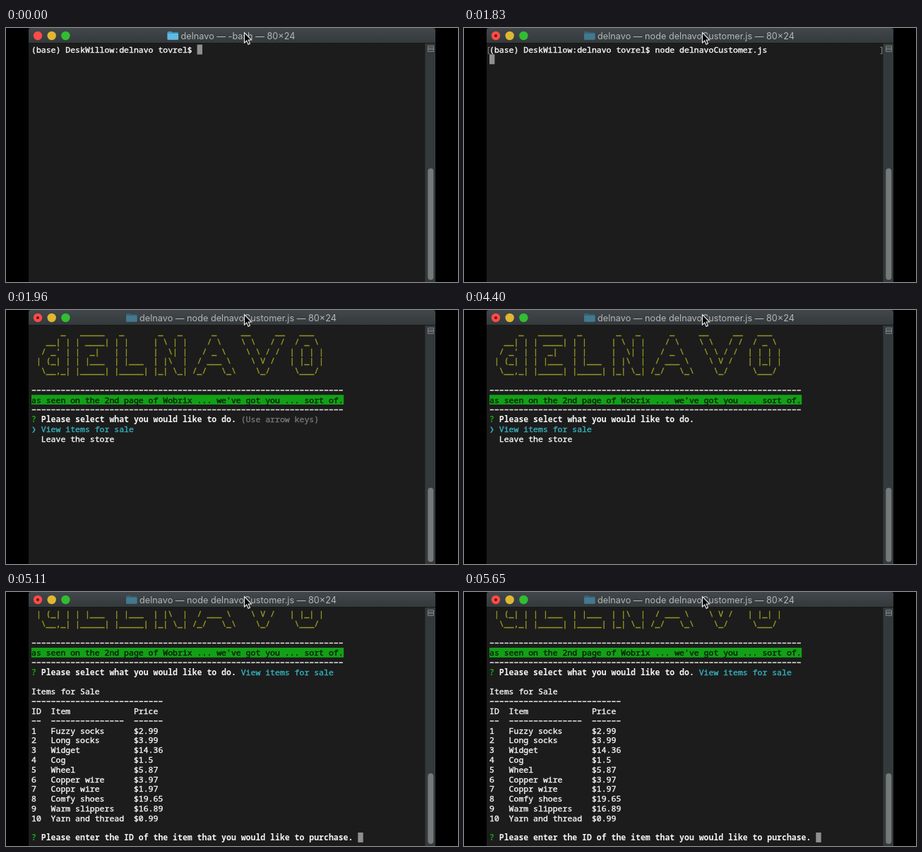
Recreate the animation shown at these times as an HTML page with a canvas. Size 640x360 px, loop 8 s.

```html
<!DOCTYPE html>
<html lang="en">
<head>
<meta charset="utf-8">
<title>Terminal store</title>
<style>
  html, body { margin: 0; width: 100%; height: 100%; overflow: hidden; background: #000; }
  canvas { display: block; }
</style>
</head>
<body>
<canvas id="stage" width="640" height="360"></canvas>
<script>
const ctx = document.getElementById('stage').getContext('2d');
const LOOP = 8000;
const LEFT = 36, TOP = 24.1, CELL = 6.9, LINE = 13.8;
const MONO = '"Noto Sans Mono", "DejaVu Sans Mono", monospace';
const WHITE = '#f4f4f4', CYAN = '#35b1bd', GREEN = '#12a116', GRAY = '#767676', YELLOW = '#9a9a24';

const PROMPT = '(base) DeskWillow:delnavo tovrel$ ';
const COMMAND = 'node delnavoCustomer.js ';
const SLOGAN = "as seen on the 2nd page of Wobrix ... we've got you ... sort of.";
const CHOICES = ['View items for sale', 'Leave the store'];
const BANNER = String.raw`
      _   _____   _       _   _      _     __     __   ___
   __| | | ____| | |     | \ | |    / \    \ \   / /  / _ \
  / _' | |  _|   | |     |  \| |   / _ \    \ \ / /  | | | |
 | (_| | | |___  | |___  | |\  |  / ___ \    \ V /   | |_| |
  \__,_| |_____| |_____| |_| \_| /_/   \_\    \_/     \___/
`.split('\n').slice(1, 6);
const ITEMS = [
  ['Fuzzy socks', '$2.99'], ['Long socks', '$3.99'], ['Widget', '$14.36'], ['Cog', '$1.5'],
  ['Wheel', '$5.87'], ['Copper wire', '$3.97'], ['Coppr wire', '$1.97'],
  ['Comfy shoes', '$19.65'], ['Warm slippers', '$16.89'], ['Yarn and thread', '$0.99']
];

const colX = col => LEFT + col * CELL;
const rowY = row => TOP + row * LINE;

function rect(x, y, w, h, color, radius = 0) {
  ctx.fillStyle = color;
  ctx.beginPath();
  ctx.roundRect(x, y, w, h, radius);
  ctx.fill();
}

function dot(x, y, r, color) {
  ctx.fillStyle = color;
  ctx.beginPath();
  ctx.arc(x, y, r, 0, 7);
  ctx.fill();
}

// A hairline outline gives the regular face its medium weight.
function print(col, row, text, color = WHITE, bold = false) {
  const x = colX(col), y = rowY(row) + 10.8;
  ctx.font = `${bold ? 700 : 400} 11.5px ${MONO}`;
  ctx.textAlign = 'left';
  ctx.fillStyle = ctx.strokeStyle = color;
  ctx.fillText(text, x, y);
  if (bold) return;
  ctx.lineWidth = 0.4;
  ctx.strokeText(text, x, y);
}

function dashes(col, row, count) {
  for (let i = 0; i < count; i++) rect(colX(col + i) + 0.7, rowY(row) + 6.2, 5.5, 1.5, '#e4e4e4');
}

function caret(col, row) {
  rect(colX(col), rowY(row) - 0.6, 7.4, 14, '#8f8f8f');
}

function question(row, text) {
  print(0, row, '?', GREEN, true);
  print(2, row, text, WHITE, true);
}

function drawFolder(x, bright) {
  const [back, front] = bright ? ['#3f9cc9', '#62b9df'] : ['#35647a', '#44788f'];
  rect(x, 5, 7, 4, back, 1);
  rect(x, 6.3, 15.5, 10, back, 1);
  rect(x, 8, 15.5, 8.7, front, 1);
}

function drawPointer() {
  ctx.beginPath();
  [[337.5, 6.5], [337.5, 21], [340.8, 17.9], [343, 23.2], [345.4, 22.2], [343.2, 17.1], [347.5, 16.8]]
    .forEach(([x, y]) => ctx.lineTo(x, y));
  ctx.closePath();
  ctx.fillStyle = '#000';
  ctx.fill();
  ctx.strokeStyle = '#f2f2f2';
  ctx.lineWidth = 1.1;
  ctx.stroke();
}

function drawWindow(running, thumbTop) {
  rect(0, 0, 640, 360, '#000');
  rect(32, 0, 576, 360, '#1c1c1c');

  const bar = ctx.createLinearGradient(0, 0, 0, 21);
  bar.addColorStop(0, '#41474a');
  bar.addColorStop(1, '#343a3c');
  rect(32, 0, 576, 21, bar, [4, 4, 0, 0]);
  rect(32, 21, 576, 1, '#151717');

  dot(45, 11, 6.2, '#fb4c47');
  dot(64.7, 11, 6.2, '#e0b733');
  dot(84.4, 11, 6.2, '#32bd32');
  if (running) dot(45, 11, 2, '#6e0c0a');

  const title = `delnavo — ${running ? COMMAND.trim() : '-bash'} — 80×24`;
  ctx.font = '12.7px Inter, sans-serif';
  ctx.textAlign = 'center';
  ctx.fillStyle = '#b3b7b8';
  ctx.fillText(title, 328.5, 15.6);
  drawFolder(328.5 - ctx.measureText(title).width / 2 - 19, !running);

  rect(593, 22, 15, 338, '#343a3c');
  rect(593, 22, 1, 338, '#282c2d');
  rect(597, 25, 9, 9, '#7c8081', 1);
  rect(598, 26, 7, 7, '#3c4244');
  rect(598, 28, 7, 1, '#7c8081');
  rect(598, 30, 7, 1, '#7c8081');
  rect(597.3, thumbTop, 8, 357 - thumbTop, '#757979', 4);
}

function drawShell(time) {
  const typed = time >= 500, entered = time >= 1700;
  const line = PROMPT + (typed ? COMMAND : '');
  print(0, 0, line);
  if (!entered) return caret(line.length, 0);
  print(-0.7, 0, '[', GRAY);
  print(80, 0, ']', GRAY);
  caret(0, 1);
}

function drawHeader(scroll) {
  BANNER.forEach((text, i) => {
    if (i >= scroll) print(0, i - scroll, text, YELLOW);
  });
  dashes(0, 6 - scroll, 64);
  rect(LEFT, rowY(7 - scroll) - 0.4, 64 * CELL + 0.6, LINE, GREEN);
  print(0, 7 - scroll, SLOGAN, '#0c190c');
  dashes(0, 8 - scroll, 64);
  question(9 - scroll, 'Please select what you would like to do.');
}

function drawMenu(time) {
  drawHeader(0);
  if (time < 3980) print(43, 9, '(Use arrow keys)', GRAY);
  const selected = time >= 3980 && time < 4400 ? 1 : 0;
  CHOICES.forEach((text, i) => {
    const active = i === selected;
    if (active) print(0, 10 + i, '❯', CYAN, true);
    print(2, 10 + i, text, active ? CYAN : WHITE);
  });
}

function drawItems() {
  drawHeader(3);
  print(43, 6, CHOICES[0], CYAN);
  print(0, 8, 'Items for Sale');
  dashes(0, 9, 27);
  [[0, 'ID', 2], [4, 'Item', 15], [21, 'Price', 6]].forEach(([col, label, width]) => {
    print(col, 10, label);
    dashes(col, 11, width);
  });
  ITEMS.forEach(([name, price], i) => {
    print(0, 12 + i, String(i + 1));
    print(4, 12 + i, name);
    print(21, 12 + i, price);
  });
  question(23, 'Please enter the ID of the item that you would like to purchase.');
  caret(67, 23);
}

function draw(time) {
  drawWindow(time >= 1830, time < 1960 ? 199 : time < 5110 ? 252 : 257);
  if (time < 1960) drawShell(time);
  else if (time < 5110) drawMenu(time);
  else drawItems();
  drawPointer();
}

const start = performance.now();
function tick() {
  draw((performance.now() - start) % LOOP);
  requestAnimationFrame(tick);
}
tick();
</script>
</body>
</html>
```
